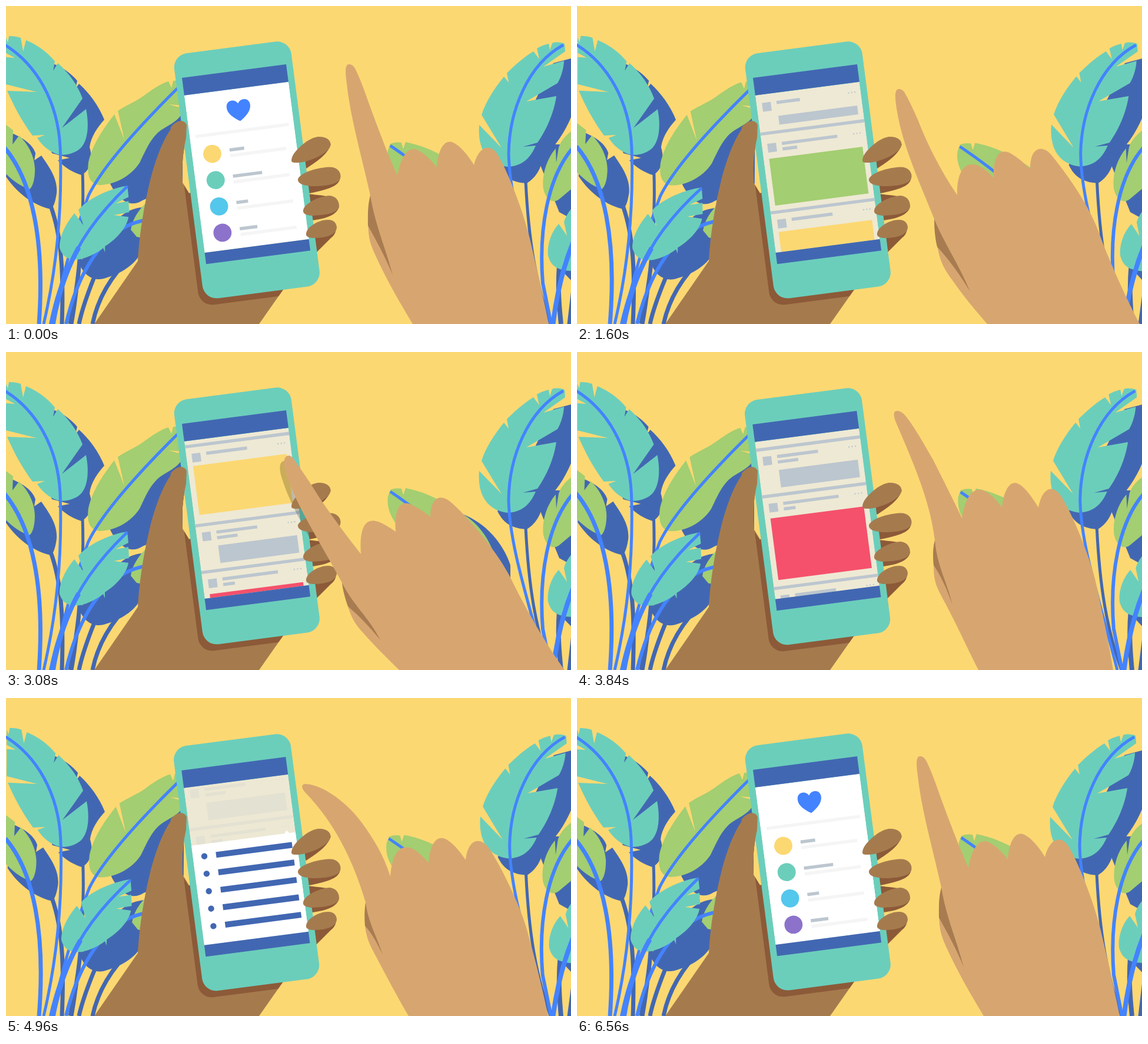
These frames come from a looping animation (960x540 px, 6600 ms). An HTML page:

```html
<!DOCTYPE html>
<html lang="en">
<head>
<meta charset="utf-8">
<title>Phone feed</title>
<style>
html, body { margin: 0; width: 100%; height: 100%; overflow: hidden; background: #fcd872; }
svg { display: block; width: 100vw; height: 100vh; }
.navy { fill: #4267b2; }
.mint { fill: #6bcebb; }
.green { fill: #a3ce71; }
.skin { fill: #a57b4e; }
.deep { fill: #8c5a38; }
.grey { fill: #bcc6cf; }
.vein, .stem { fill: none; stroke: #4483ff; stroke-width: 5; }
.stem { stroke: #4267b2; }
.sway { transform: rotate(calc(var(--s) * var(--a))); }
</style>
</head>
<body>
<svg id="stage" viewBox="0 0 960 540" preserveAspectRatio="none">
  <defs>
    <clipPath id="view"><rect y="30" width="178.5" height="269.5"/></clipPath>
    <clipPath id="case"><rect x="-11" y="-40.5" width="200.5" height="419.5" rx="24" transform="translate(299 122) rotate(-7.4)"/></clipPath>
    <path id="arm" d="M150 540L224 433C226 395 233 345 245 296C255 255 275 205 294 196C306 193 309 207 306 224C301 246 298 270 300 300L311 318L360 300L500 440L470 483L430 540Z"/>
    <clipPath id="palm"><use href="#arm"/></clipPath>
  </defs>
  <rect width="960" height="540" fill="#fcd872"/>

  <!-- left plants -->
  <g class="sway" style="--a:.17deg;transform-origin:112px 540px">
    <path class="stem" d="M130 280C133 370 126 460 112 540"/>
    <path class="navy" d="M80 98C98 105 111 115 121 127L118 140L124 132C141 147 158 170 167 193C156 205 144 222 142 240C149 262 142 280 128 287C115 283 100 275 88 262L108 258L78 250L60 200Z"/>
  </g>
  <g class="sway" style="--a:.65deg;transform-origin:95px 540px">
    <path class="stem" stroke-width="7" style="stroke-width:7" d="M76 340C94 390 98 450 95 540"/>
    <path class="navy" d="M5 214C30 224 45 235 50 250L48 262L60 254C72 272 88 292 86 317C84 332 81 340 77 345C50 340 20 320 0 290Z"/>
  </g>
  <g class="sway" style="--a:.45deg;transform-origin:80px 540px">
    <path class="navy" d="M300 165V300L232 330C214 342 193 334 177 302Z"/>
    <path class="green" d="M300 126L284 127L281 139L276 128C262 132 248 142 233 153C219 163 205 168 190 178L201 227L184 184C162 212 146 238 140 265C137 288 142 303 160 304C190 303 215 285 227 266C238 243 244 229 256 217C268 205 288 200 298 184L298 173L276 167L300 169Z"/>
    <path class="vein" d="M296 135C230 200 165 270 140 322C115 390 95 460 78 540"/>
  </g>
  <g class="sway" style="--a:.8deg;transform-origin:130px 540px">
    <path class="stem" style="stroke-width:7" d="M190 450C166 480 153 510 147 540M150 460C138 490 129 515 124 540M125 430C122 470 115 510 109 540"/>
    <path class="navy" d="M238 341C215 343 202 349 185 366L124 436C132 458 150 470 172 461C200 453 222 435 228 420L238 380Z"/>
    <path class="green" d="M240 332C224 347 214 364 212 380L222 392L240 396Z"/>
    <path class="vein" style="stroke-width:6" d="M242 363C175 370 125 440 102 540"/>
  </g>
  <g class="sway" style="--a:1.45deg;transform-origin:80px 540px">
    <path class="mint" d="M206 305C178 309 140 326 123 346L131 372L116 352C101 370 90 392 91 411C96 426 105 432 126 430C140 427 155 419 165 411L168 418V408C190 394 205 375 208 358L183 355L209 350L208 331L186 335L208 324Z"/>
    <path class="vein" style="stroke-width:5" d="M206 306C160 350 122 400 104 452"/>
    <path d="M120 408L127 412C107 447 91 495 84 540H73C82 494 97 450 120 408Z" fill="#4483ff"/>
  </g>
  <g class="sway" style="--a:.17deg;transform-origin:64px 540px">
    <path class="mint" d="M0 54L3 62L5 51C12 51 19 52 25 54L29 77L34 58C53 66 70 78 83 94L80 110L88 97C108 115 122 135 130 157L95 207L136 175C141 200 140 226 128 240C117 252 96 255 85 251C70 245 59 234 53 224L66 219L45 220C28 197 13 170 2 144L52 146L0 133V87L15 88L0 80Z"/>
    <path class="vein" d="M-2 66C50 98 88 160 92 240C96 350 85 450 64 540"/>
  </g>
  <g class="sway" style="--a:.6deg;transform-origin:56px 540px">
    <path class="green" d="M-4 199L12 211L11 235L22 220C39 236 48 256 49 277C49 296 45 307 40 311C23 306 8 294 -4 281Z"/>
    <path class="vein" style="stroke-width:7" d="M-4 239C45 295 66 400 56 540"/>
  </g>

  <!-- right plants -->
  <g class="sway" style="--a:-.5deg;transform-origin:860px 540px">
    <path class="navy" d="M775 275C815 290 845 325 857 362V400L780 380Z"/>
    <path class="green" d="M653 234C660 231 667 231 672 232L675 243L679 231C725 240 760 265 775 275C800 288 820 315 830 345V400L700 330C665 300 645 275 649 245Z"/>
    <path class="vein" d="M653 237C690 262 740 300 780 345"/>
  </g>
  <g class="sway" style="--a:.12deg;transform-origin:925px 540px">
    <path class="stem" d="M883 298C888 400 900 470 925 540"/>
    <path class="navy" d="M960 89L930 97L880 200L835 270C845 292 862 300 885 301C903 290 910 272 913 255L904 263C930 245 950 215 962 184Z"/>
  </g>
  <g class="sway" style="--a:.35deg;transform-origin:918px 540px">
    <path class="mint" d="M949 64C941 61 933 61 928 63L924 75L922 64C914 66 907 69 902 72L906 90L896 77C878 88 862 103 851 114L854 130L846 120C828 142 814 165 808 185L842 241L804 202C801 235 812 268 852 273C876 272 890 260 900 237L878 239L903 232C922 205 932 175 935 153L884 162L937 131C945 118 948 100 948 93L913 103L950 77Z"/>
    <path class="vein" d="M947 66C885 100 855 180 854 250C855 330 890 430 918 540"/>
  </g>
  <path class="navy" d="M960 235L932 235L905 263L940 350L962 362Z"/>
  <g class="sway" style="--a:-.25deg;transform-origin:926px 540px">
    <path class="green" d="M964 210C950 220 942 230 939 241L935 266L934 242C920 258 910 285 913 310C917 330 930 336 940 328L964 308Z"/>
    <path class="vein" style="stroke-width:6" d="M964 240C920 290 905 380 912 470L926 540"/>
  </g>
  <g class="sway" style="--a:1deg;transform-origin:930px 540px">
    <path class="stem" style="stroke-width:8" d="M940 440C937 480 940 510 943 540M964 485L957 545"/>
    <path class="navy" d="M940 445L966 440V472Z"/>
    <path class="mint" d="M966 338C957 347 950 358 948 367L953 390L939 370C925 385 919 408 921 424C926 442 937 450 966 450Z"/>
    <path class="vein" style="stroke-width:8" d="M966 395C947 440 935 490 929 545"/>
  </g>

  <!-- holding hand and phone -->
  <use href="#arm" class="skin"/>
  <g class="deep">
    <path d="M495 266L552 234C548 252 525 266 510 276Z"/>
    <path d="M500 298L568 290C567 306 550 312 500 321Z"/>
    <path d="M500 318C520 320 535 321 550 324L566 340C563 355 545 362 505 366Z"/>
    <path d="M505 385L561 378C560 386 557 390 552 394L526 420Z"/>
  </g>
  <g id="phone">
    <g clip-path="url(#palm)"><rect class="deep" x="-11" y="-40.5" width="200.5" height="419.5" rx="24" transform="translate(291.5 133) rotate(-7.4)"/></g>
    <g transform="translate(299 122) rotate(-7.4)">
      <rect class="mint" x="-11" y="-40.5" width="200.5" height="419.5" rx="24"/>
      <g clip-path="url(#view)">
        <rect y="30" width="178.5" height="270" fill="#eee9d4"/>
        <g id="feed"></g>
        <rect id="veil" y="30" width="178.5" height="270" fill="#eee9d4"/>
        <g id="menu"><path d="M0 129H159.5L163.7 124L168 129H179V310H0Z" fill="#fff"/></g>
        <g id="list">
          <rect y="30" width="179" height="270" fill="#fff"/>
          <path d="M88.8 85.5C79 79 68.5 71 68.7 60C69 47 84 46 88.8 55.5C93.5 46 109 47 109 60C109 71 99 79 88.8 85.5Z" fill="#4483ff"/>
        </g>
      </g>
      <rect class="navy" width="178.5" height="30"/>
      <rect class="navy" y="299.4" width="178.5" height="19.6"/>
    </g>
  </g>
  <g clip-path="url(#case)"><path id="shadow" transform="translate(-7 9)" opacity=".2"/></g>
  <path class="skin" d="M307 200L306 224C301 246 298 270 300 300L270 280L280 206C290 193 303 192 307 202Z"/>
  <g class="skin">
    <path d="M485 262C485 248 513 224 530 222C547 221 555 231 550 240C540 256 507 267 492 266C487 266 485 265 485 262Z"/>
    <path d="M496 294C499 283 530 274 549 273.500C562 273 569 281 568.500 290C567 304 540 306 520 306C507 305 495 302 496 294Z"/>
    <path d="M505 347C506 336 530 324 548 322C560 322 566 330 566 340C564 353 540 355 520 356C510 355 504 353 505 347Z"/>
    <path d="M510 386C512 374 532 363 547 363C557 363 562 369 562 377C559 391 540 394 520 394C513 393 509 391 510 386Z"/>
  </g>

  <!-- pointing hand -->
  <path id="hand" fill="#d7a670"/>
  <path id="crease" fill="#a87c50"/>
</svg>
<script>
const $ = id => document.getElementById(id);
const add = (box, tag, attrs) => {
  const el = document.createElementNS('http://www.w3.org/2000/svg', tag);
  for (const k in attrs) el.setAttribute(k, attrs[k]);
  $(box).append(el);
};
const rect = (box, x, y, width, height, fill) => add(box, 'rect', { x, y, width, height, fill });
const dot = (box, cx, cy, r, fill) => add(box, 'circle', { cx, cy, r, fill });
const GREY = '#bcc6cf', PALE = '#f5f5f5', NAVY = '#4267b2';

// contact list
rect('list', 10, 99, 160, 5.5, PALE);
[['#fcd872', 25], ['#6bcebb', 50], ['#54c7ec', 20], ['#8c72cb', 30]].forEach(([color, w], i) => {
  const y = 134.6 + 45 * i;
  dot('list', 34.4, y, 15.4, color);
  rect('list', 64.4, y - 5.5, w, 5.5, GREY);
  rect('list', 64.4, y + 4.2, 96, 5.5, PALE);
});

// feed cards; y = 0 is the first separator
function card(top, avatar, w1, w2, x, y, h, color) {
  rect('feed', 0, top - 2.7, 178.5, 5.4, GREY);
  rect('feed', 9.5, avatar, 15, 15, GREY);
  rect('feed', 34.3, avatar - .3, w1, 5.4, GREY);
  if (w2) rect('feed', 34.3, avatar + 9.2, w2, 5.4, GREY);
  for (const i of [-1, 0, 1]) dot('feed', 163 + 5.5 * i, avatar + 2, 1.2, GREY);
  rect('feed', x, y, 169.5 - x, h, color);
}
card(-80, -52.2, 40, 0, 34.3, -27, 15, GREY);
card(0, 17.8, 95, 25, 9.5, 43.5, 80, '#a3ce71');
card(134.8, 147.8, 70, 0, 9.5, 168.8, 83.8, '#fcd872');
card(270.1, 282.8, 70, 35, 34.3, 308, 30, GREY);
card(350, 363, 95, 20, 9.5, 388.2, 105.3, '#f5516c');
card(507, 520, 70, 0, 34.3, 545, 30, GREY);

for (let i = 0; i < 5; i++) {
  dot('menu', 19.6, 149.6 + 29.9 * i, 5.2, NAVY);
  rect('menu', 39.7, 144.8 + 29.9 * i, 130.3, 10, NAVY);
}

// hand poses: outline numbers | crease numbers
const nums = s => s.trim().split(/\s+/).map(Number);
const poses = {
  rest: `583 99 576 98 576 112 579 132 585 190 606 262 619 322 614 340 615 370 616 385 618 405 624 415 634 437 655 480 672 508 691 540
    922 540 912 490 904 455 890 395 878 345 850 275 834 250 822 233 803 238 795 270 785 253 772 238 760 232 744 225 734 245 732 274
    722 261 710 249 698 244 681 238 670 260 665 288 650 255 635 215 619 172 608 140 599 117 593 106 590 101 587 99 583 99
    | 619 322 614 340 615 360 615 373 630 400 644 425 657 457 645 410 628 375 619 322`,
  near: `546 141 539 143 540 156 544 180 554 240 585 306 607 362 607 375 609 395 613 412 617 435 626 450 638 466 658 495 678 518 697 540
    956 540 940 510 905 436 885 380 868 335 830 282 806 253 789 233 769 242 770 277 760 267 750 258 738 251 722 241 706 250 708 292
    700 283 691 275 682 271 662 263 645 277 646 321 620 283 598 241 579 193 569 170 562 156 556 146 552 141 549 141 546 141
    | 607 362 607 375 608 393 612 409 630 428 650 455 668 485 648 437 626 407 607 362`,
  high: `462 160 453 161 451 170 456 178 480 228 540 300 575 357 577 370 581 388 586 401 593 425 603 438 617 453 645 484 675 513 706 540
    972 540 950 506 898 430 868 370 838 320 785 256 756 223 741 207 725 215 726 250 715 241 704 234 692 228 676 218 665 233 667 271
    657 264 648 258 637 255 615 249 605 266 608 308 576 268 549 240 521 211 501 189 486 173 473 163 469 160 466 160 462 160
    | 575 357 577 370 580 385 586 400 605 417 622 436 640 458 621 420 595 396 575 357`,
  low: `479 176 471 178 471 190 475 203 492 260 535 325 571 392 573 408 577 420 581 432 588 455 596 465 606 476 627 500 648 520 668 540
    949 540 920 500 885 440 858 385 838 344 790 285 757 256 738 239 721 247 721 280 710 271 701 265 690 260 672 250 659 263 662 305
    652 298 643 292 632 288 611 281 600 297 603 343 577 310 553 278 531 245 511 213 499 196 489 182 486 177 483 176 479 176
    | 571 392 573 408 577 420 581 432 600 448 618 467 636 489 616 450 590 430 571 392`,
  lift: `543 100 536 101 538 111 543 122 570 185 600 252 608 320 604 335 605 350 606 365 606 390 612 400 621 418 645 462 663 503 682 540
    911 540 903 490 890 430 880 385 870 345 842 275 822 244 808 223 790 231 784 264 774 248 762 230 750 224 736 216 725 235 722 264
    712 250 701 239 690 235 673 229 660 245 654 282 638 248 622 217 605 183 585 148 570 122 556 106 551 101 547 100 543 100
    | 608 320 604 335 605 350 606 362 618 380 629 403 638 430 630 393 612 365 608 320`,
  bent: `508 146 501 147 502 153 508 160 555 208 588 270 611 347 609 360 609 373 610 387 612 405 617 417 624 430 645 470 665 508 684 540
    921 540 911 490 898 440 885 393 873 350 838 280 820 254 804 233 784 242 781 275 771 260 759 246 748 240 731 231 720 250 718 280
    708 269 699 259 688 255 670 249 656 262 653 303 642 268 626 241 604 211 582 181 550 157 525 149 519 147 513 146 508 146
    | 611 347 609 360 609 373 610 387 622 400 631 417 640 436 630 405 615 380 611 347`
};
for (const k in poses) poses[k] = poses[k].split('|').map(nums);

// time, pose, shift x, shift y
const moves = [
  [0, 'rest', 0, 0], [350, 'rest', 0, 0], [760, 'high', 5, 75], [900, 'high', 5, 75],
  [1600, 'near', 0, 0], [1950, 'low', 8, 60], [2400, 'high', 0, 0], [2650, 'near', 0, 0],
  [2940, 'low', 4, 25], [3080, 'low', 0, 0], [3350, 'high', 0, 0], [3840, 'lift', 0, 0],
  [4300, 'low', -4, 44], [4430, 'low', -4, 44], [4960, 'bent', 0, 0],
  [5400, 'low', -10, 80], [5520, 'low', -10, 80], [6150, 'rest', 0, 0], [6600, 'rest', 0, 0]
];
const scroll = [[0, 96.5], [1950, 96.5], [2050, 85], [2400, -31.4], [2600, -70], [2850, -88], [2980, -90],
  [3080, -95], [3350, -170], [3550, -205], [3840, -225.6], [4200, -248], [6600, -248]];
const nudge = [[0, 0], [1800, 0], [2150, 1], [2450, 1], [2850, 0], [3250, 0], [3600, 1], [5100, 1], [5600, 0], [6600, 0]];

const mix = (a, b, k) => a + (b - a) * k;
const smooth = k => k * k * (3 - 2 * k);
const ramp = (t, a, b) => smooth(Math.min(1, Math.max(0, (t - a) / (b - a))));
function span(keys, t) {
  let i = 0;
  while (i < keys.length - 2 && t >= keys[i + 1][0]) i++;
  const a = keys[i], b = keys[i + 1];
  return [a, b, (t - a[0]) / (b[0] - a[0])];
}
const value = (keys, t) => { const [a, b, k] = span(keys, t); return mix(a[1], b[1], k); };
const set = (id, name, v) => $(id).setAttribute(name, v);
const shift = (id, x, y) => set(id, 'transform', `translate(${x} ${y})`);

function drawHand(t) {
  const [a, b, k] = span(moves, t), e = smooth(k);
  const shape = part => poses[a[1]][part].map((v, i) =>
    mix(v + a[2 + i % 2], poses[b[1]][part][i] + b[2 + i % 2], e).toFixed(2));
  const n = shape(0), c = shape(1);
  const d = `M${n.slice(0, 2)}C${n.slice(2, 32)}L${n.slice(32, 34)}C${n.slice(34)}Z`;
  set('hand', 'd', d);
  set('shadow', 'd', d);
  set('crease', 'd', `M${c.slice(0, 2)}C${c.slice(2)}Z`);
}

function draw(now) {
  const t = now % 6600;
  $('stage').style.setProperty('--s', (1 + Math.cos(2 * Math.PI * (t - 1420) / 3300)) / 2);
  const n = value(nudge, t);
  shift('phone', -.7 * n, .9 * n);
  shift('feed', 0, value(scroll, t));
  shift('menu', 0, 180 * (1 - ramp(t, 4440, 4760)));
  set('veil', 'opacity', .8 * ramp(t, 4440, 4700));
  if (t < 3000) shift('list', -180 * ramp(t, 880, 1200), 0);
  else shift('list', 0, 272 * (1 - ramp(t, 5520, 5840)));
  drawHand(t);
}
const start = performance.now();
(function tick() {
  draw(performance.now() - start);
  requestAnimationFrame(tick);
})();
</script>
</body>
</html>
```
